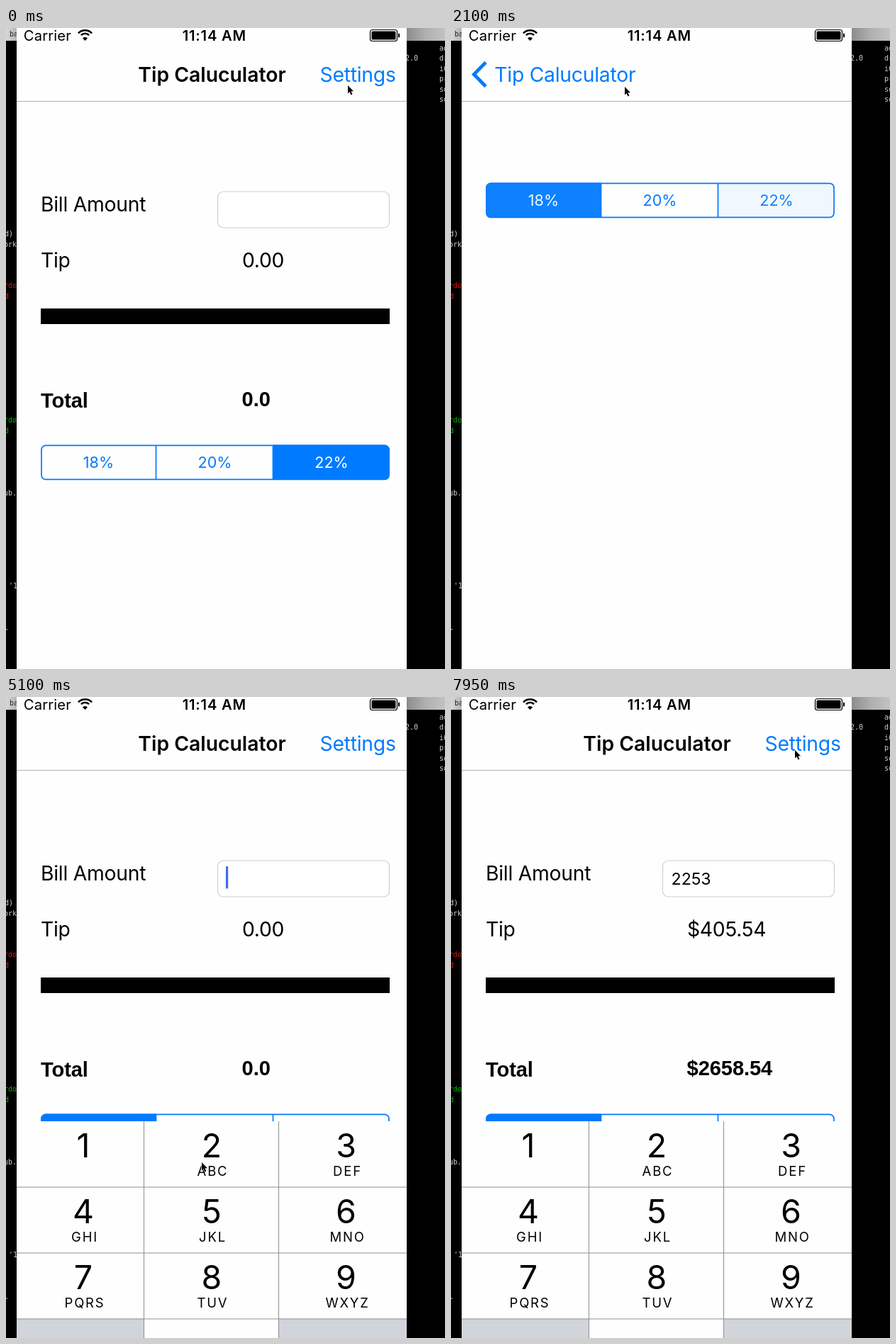
An HTML page that plays this animation: 619 by 905 pixels, repeating every 8 s.

```html
<!DOCTYPE html>
<html lang="en">
<head>
<meta charset="utf-8">
<title>Tip calculator</title>
<style>
html, body { margin: 0; width: 100%; height: 100%; overflow: hidden; background: #000; }
svg { display: block; width: 619px; height: 905px; font-optical-sizing: none; }
text { white-space: pre; }
.ui { font: 400 28.3px Inter, sans-serif; letter-spacing: -.25px; }
.semi { font-weight: 600; }
.ui.semi { letter-spacing: 0; }
.bold { font: 700 29.1px "Liberation Sans", sans-serif; letter-spacing: -.1px; }
.status { font: 400 20.2px Inter, sans-serif; letter-spacing: .2px; }
.status.semi { font-weight: 600; letter-spacing: .8px; }
.field { font: 400 23.2px Inter, sans-serif; letter-spacing: -.1px; }
.seg { font: 400 21.6px Inter, sans-serif; text-anchor: middle; }
.digit { font: 400 46.5px Inter, sans-serif; text-anchor: middle; }
.letters { font: 400 18.5px Inter, sans-serif; letter-spacing: 1.8px; text-anchor: middle; }
.term { font: 10px "DejaVu Sans Mono", monospace; fill: #d0d0d0; }
.blue { fill: #007aff; }
</style>
</head>
<body>
<svg id="stage" viewBox="0 0 619 905" xmlns="http://www.w3.org/2000/svg"></svg>
<script>
const LOOP = 8000, STEP = 150;
const BLUE = [0, 122, 255];
const KEY_X = [15, 195, 385, 565], KEY_Y = 599, KEY_H = 93;
const LETTERS = ["", "ABC", "DEF", "GHI", "JKL", "MNO", "PQRS", "TUV", "WXYZ"];

// time, x, y of the pointer tip
const POINTER = [
  [0, 482, 81], [600, 481, 84], [750, 476, 89], [900, 468, 94], [1050, 468, 94],
  [1200, 440, 120], [1350, 360, 180], [1500, 240, 230], [1650, 150, 245], [1950, 150, 245],
  [2100, 245, 83], [2250, 243, 74], [2550, 243, 74], [2700, 290, 160], [3000, 393, 416],
  [3150, 408, 380], [3450, 400, 268], [3900, 400, 258], [4200, 400, 258], [4650, 282, 640],
  [5100, 276, 657], [5550, 276, 657], [5700, 340, 716], [5850, 344, 709], [6000, 430, 665],
  [6150, 470, 650], [6300, 470, 650], [6450, 300, 560], [6600, 98, 400], [6750, 273, 333],
  [7200, 273, 333], [7350, 300, 300], [7500, 380, 210], [7650, 450, 130], [7800, 517, 88],
  [7950, 485, 75]
];
// start, end, key held down
const PRESSES = [[5250, 5400, 2], [5550, 5700, 2], [5850, 6000, 5], [6150, 6450, 3]];

const stage = document.getElementById("stage");
const clamp = v => Math.max(0, Math.min(1, v));
const text = (x, y, cls, str, more = "") => `<text x="${x}" y="${y}" class="${cls}" ${more}>${str}</text>`;
const rect = (x, y, w, h, fill, more = "") =>
  `<rect x="${x}" y="${y}" width="${w}" height="${h}" fill="${fill}" ${more}/>`;
const line = (x1, y1, x2, y2, color, width) =>
  `<path d="M${x1} ${y1}L${x2} ${y2}" stroke="${color}" stroke-width="${width}"/>`;

function segments(name, y) {
  const edges = [49, 211.5, 376.5, 541], mids = [130.5, 294.5, 459];
  let fills = "", labels = "";
  ["18%", "20%", "22%"].forEach((label, i) => {
    fills += rect(edges[i], 0, edges[i + 1] - edges[i], 51, "#007aff", `id="${name}Fill${i}"`);
    labels += text(mids[i], 33, "seg", label, `id="${name}Label${i}"`);
  });
  return `<g transform="translate(0 ${y})"><g clip-path="url(#segClip)">${fills}</g>
    ${rect(50, 1.3, 490, 48, "none", 'rx="6" stroke="#007aff" stroke-width="1.7"')}
    ${line(211.5, 1, 211.5, 49, "#007aff", 1.7)}${line(376.5, 1, 376.5, 49, "#007aff", 1.7)}${labels}</g>`;
}

function keypad() {
  let keys = "", lines = "";
  LETTERS.forEach((letters, i) => {
    const col = i % 3, top = KEY_Y + Math.floor(i / 3) * KEY_H;
    keys += rect(KEY_X[col], top, KEY_X[col + 1] - KEY_X[col], KEY_H, "#fefefe", `id="key${i + 1}"`);
    keys += text([109, 290, 479.5][col], top + 51, "digit", i + 1);
    keys += text([111, 291.5, 481.5][col], top + 77, "letters", letters);
  });
  for (let r = 1; r < 4; r++) {
    const y = KEY_Y + r * KEY_H;
    lines += line(15, y, 565, y, "#8e8e8e", 1);
  }
  for (const x of [194.5, 384.5]) lines += line(x, KEY_Y, x, 970, "#8e8e8e", 1);
  return `<g id="keypad">${rect(15, KEY_Y, 550, 372, "#d1d4db")}
    ${rect(195, 878, 190, 93, "#fefefe")}${keys}${lines}</g>`;
}

function terminal() {
  const right = ["ad", "dr", "iC", "pr", "so", "so"].map((s, i) =>
    text(611, 31.5 + i * 14.5, "term", s, i ? "" : 'font-style="italic"')).join("");
  const left = [
    [-2, 294, "d)"], [-3, 308.5, "ork"], [-3, 367, "rdo", "#d01c10"], [-2, 381.5, "d", "#d01c10"],
    [-3, 556.5, "rdo", "#00b400"], [-2, 571.5, "d", "#00b400"], [-3, 659.5, "ub."],
    [4, 791, "'1"], [-2, 850, "."]
  ].map(([x, y, s, c]) => text(x, y, "term", s, c ? `style="fill:${c}"` : "")).join("");
  return rect(0, 0, 619, 905, "#000") + rect(0, 0, 15, 18, "url(#barLeft)") +
    rect(565, 0, 54, 18, "url(#barRight)") + text(5, 12, "term", "ba", 'style="fill:#222"') +
    left + right + text(563, 45.5, "term", "2.0");
}

function statusBar() {
  const arcs = [[9.5, 6.6], [5.6, 3.9]].map(([r, h]) =>
    `<path d="M${111.5 - r} ${17 - h - 3}A${r * 1.38} ${r * 1.38} 0 0 1 ${111.5 + r} ${17 - h - 3}"
      fill="none" stroke="#000" stroke-width="2.5"/>`).join("");
  return text(24.7, 18, "status", "Carrier") +
    text(293.8, 18, "status semi", "11:14 AM", 'text-anchor="middle"') + arcs +
    `<path d="M111.5 18L108 14.4Q111.5 11.6 115 14.4Z"/>` +
    rect(513.5, 2.5, 38, 16, "#fff", 'rx="3" stroke="#000" stroke-width="1.2"') +
    rect(515.5, 4.5, 34, 12, "#000", 'rx="1.5"') + rect(553, 7.5, 2, 6, "#000", 'rx="1"');
}

const gradient = (id, stops) => `<linearGradient id="${id}">` + stops.map(([o, c, a = 1]) =>
  `<stop offset="${o}" stop-color="${c}" stop-opacity="${a}"/>`).join("") + "</linearGradient>";

stage.innerHTML = `<defs>
  ${gradient("barLeft", [[0, "#d8d8d8"], [1, "#b4b4b4"]])}
  ${gradient("barRight", [[0, "#8c8c8c"], [.5, "#b0b0b0"], [1, "#c2c2c2"]])}
  ${gradient("edge", [[0, "#000", 0], [1, "#000", .09]])}
  <clipPath id="segClip">${rect(49.2, .5, 491.6, 49.6, "#000", 'rx="7"')}</clipPath>
  <clipPath id="phone">${rect(15, 0, 550, 905, "#000")}</clipPath></defs>
  ${terminal()}
  <g clip-path="url(#phone)">
    <g id="mainPage">${rect(15, 0, 750, 905, "#fefefe")}
      ${text(49, 259, "ui", "Bill Amount")}
      ${rect(298.5, 231, 242, 51, "#fff", 'rx="8" stroke="#cfcfcf" stroke-width="1.2"')}
      ${text(310.6, 264.5, "field", "", 'id="bill"')}
      ${rect(310, 239, 3.2, 31.5, "#426bf2", 'id="caret" rx="1"')}
      ${text(49, 338, "ui", "Tip")}${text(332.9, 338, "ui", "", 'id="tip"')}
      ${rect(49, 396, 492, 22, "#000")}
      ${text(49, 535.5, "bold", "Total")}${text(332.6, 534, "bold", "", 'id="total"')}
      ${segments("main", 588)}
    </g>
    ${rect(15, 0, 550, 905, "#000", 'id="dim"')}
    <g id="settingsPage">${rect(3, 0, 12, 905, "url(#edge)", 'id="shadow"')}${rect(15, 0, 550, 905, "#fefefe")}
      ${segments("settings", 218)}
    </g>
    ${line(15, 103.5, 565, 103.5, "#b3b3b3", 1)}
    ${text(290.5, 76, "ui semi", "Tip Caluculator", 'id="title" text-anchor="middle"')}
    ${text(442.6, 76, "ui blue", "Settings", 'id="open"')}
    <path id="chevron" d="M49 48.5L32.3 65.5L49 82.5" fill="none" stroke="#007aff" stroke-width="4.8"/>
    ${text(61.3, 76, "ui blue", "Tip Caluculator", 'id="back"')}
    ${statusBar()}${keypad()}
  </g>
  <path id="pointer" d="M0 0V11.4L2.5 9L4.5 13.6L6.4 12.7L4.5 8.2H8Z" fill="#000" stroke="#fff"
    stroke-width="1" stroke-linejoin="round" paint-order="stroke"/>`;

const $ = id => document.getElementById(id);
const set = (id, name, value) => $(id).setAttribute(name, value);
const move = (id, x, y) => set(id, "transform", `translate(${x.toFixed(2)} ${y.toFixed(2)})`);

// critically damped slide, 0 to 1
function spring(ms) {
  const k = Math.max(0, ms) * .017;
  return 1 - Math.exp(-k) * (1 + k);
}

// selection passes from 22% to 18%
function select(name, ms) {
  const u = clamp(ms / 233), w = u * u * (3 - 2 * u);
  [w, 0, 1 - w].forEach((v, i) => {
    set(name + "Fill" + i, "opacity", v);
    set(name + "Label" + i, "fill", `rgb(${BLUE.map(c => Math.round(c + (255 - c) * v))})`);
  });
}

function pointerAt(t) {
  const i = POINTER.findIndex(p => p[0] > t);
  if (i < 0) return POINTER[POINTER.length - 1].slice(1);
  const [t0, x0, y0] = POINTER[i - 1], [t1, x1, y1] = POINTER[i];
  const u = (t - t0) / (t1 - t0);
  return [x0 + (x1 - x0) * u, y0 + (y1 - y0) * u];
}

function caretAlpha(t) {
  if (t < 4050) return 0;
  if (t === 6900 || t === 7800) return .4;
  return t < 6900 || (t >= 7350 && t < 7800) ? 1 : 0;
}

function draw(time) {
  const t = Math.floor(time / STEP) * STEP;
  const p = t < 2570 ? spring(t - 930) : 1 - spring(t - 2570);

  // pages rest on whole pixels
  move("mainPage", Math.round(-165 * p), 0);
  set("dim", "opacity", .1 * p);
  move("settingsPage", Math.round(550 * (1 - p)), 0);
  set("shadow", "opacity", clamp(p * 4));
  select("main", t - 3100);
  select("settings", t - 1900);

  const backAlpha = clamp((p - .58) / .42);
  move("title", -118 * p, 0);
  set("title", "opacity", clamp(1 - p * 1.22));
  set("open", "opacity", t === 750 || t === 900 ? .3 : clamp(1 - p * 1.5));
  set("chevron", "opacity", backAlpha);
  move("back", 118 * (1 - p), 0);
  set("back", "opacity", t === 2400 || t === 2550 ? .3 : backAlpha);

  const bill = "2253".slice(0, [5250, 5550, 5850, 6150].filter(s => t >= s).length);
  const amount = Number(bill), tip = amount * .18;
  $("bill").textContent = bill;
  $("tip").textContent = bill ? "$" + tip.toFixed(2) : "0.00";
  $("total").textContent = bill ? "$" + (amount + tip).toFixed(2) : "0.0";
  move("caret", 14.1 * bill.length, 0);
  set("caret", "opacity", caretAlpha(t));

  move("keypad", 0, 371 * Math.pow(1 - clamp((t - 4000) / 350), 3));
  const press = PRESSES.find(([from, to]) => t >= from && t < to);
  for (let k = 1; k <= 9; k++) set("key" + k, "fill", press && press[2] === k ? "#d1d4db" : "#fefefe");

  move("pointer", ...pointerAt(t));
}

const start = performance.now();
function tick() {
  draw((performance.now() - start) % LOOP);
  requestAnimationFrame(tick);
}
tick();
</script>
</body>
</html>
```
